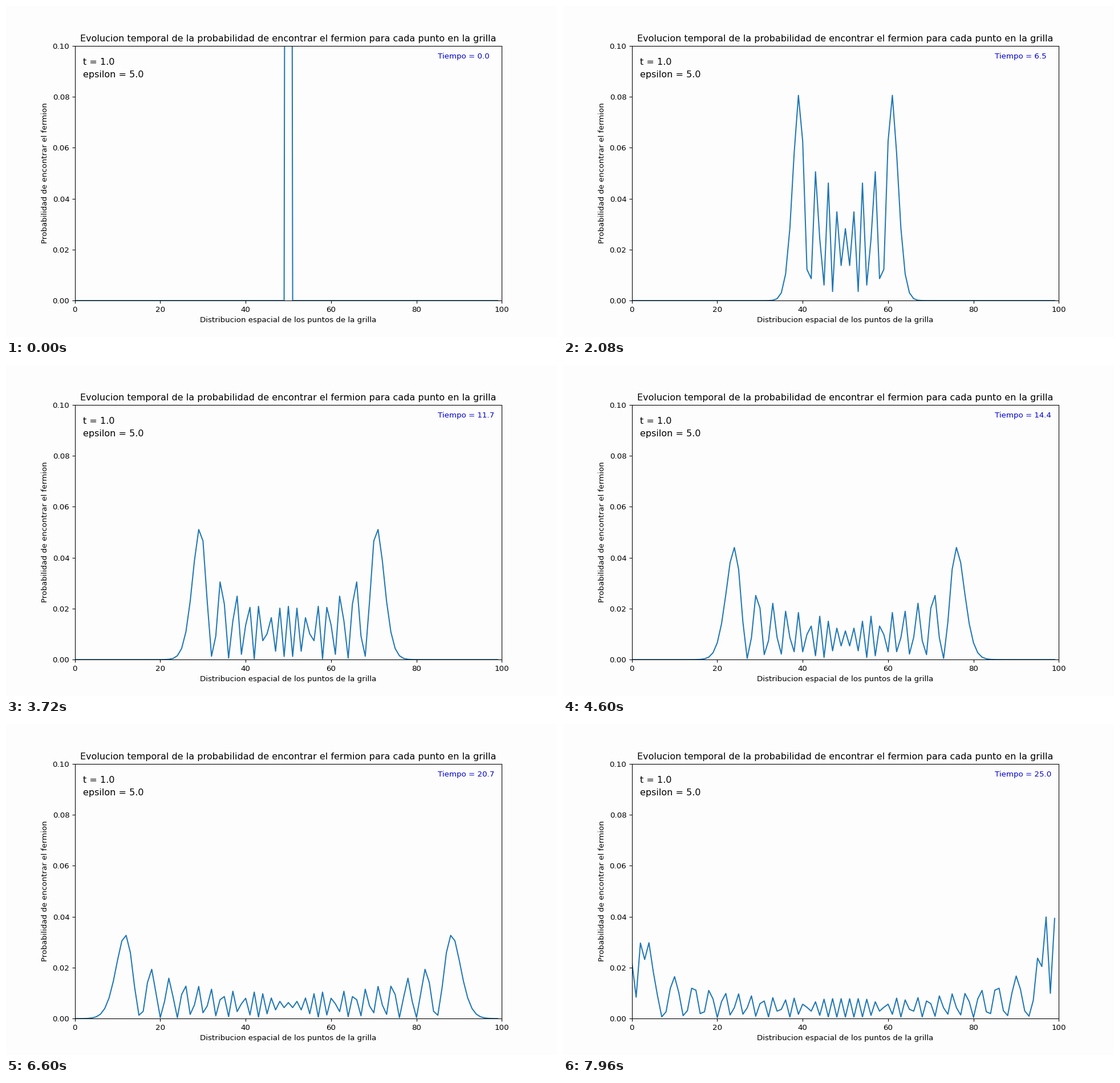
A matplotlib script that plays this animation: 966 px wide and 580 px high, repeating every 8000 ms.

```python
import numpy as np
import matplotlib.pyplot as plt
from matplotlib.animation import FuncAnimation

SITES, START = 100, 50
HOP, EPSILON = 1.0, 5.0
FRAMES, T_MAX = 200, 25.0
DPI = 96.6
PAPER = "#fdfdfd"
LARGE = 11.95

times = np.linspace(0, T_MAX, FRAMES)
dt = times[1] - times[0]


def evolve():
    """Site probabilities of a tight-binding chain, integrated with RK4."""
    H = EPSILON * np.eye(SITES) - HOP * (np.eye(SITES, k=1) + np.eye(SITES, k=-1))
    A = -1j * dt * H
    psi = np.zeros(SITES, dtype=complex)
    psi[START] = 1
    states = [psi, psi]
    while len(states) < FRAMES:
        k1 = A @ psi
        k2 = A @ (psi + k1 / 2)
        k3 = A @ (psi + k2 / 2)
        k4 = A @ (psi + k3)
        psi = psi + (k1 + 2 * k2 + 2 * k3 + k4) / 6
        states.append(psi)
    return np.abs(states) ** 2


prob = evolve()

plt.rcParams["font.family"] = "DejaVu Sans"
fig, ax = plt.subplots(figsize=(966 / DPI, 580 / DPI), dpi=DPI, facecolor=PAPER)
ax.set_facecolor(PAPER)
ax.set_xlim(0, 100)
ax.set_ylim(0, 0.1)
ax.set_title("Evolucion temporal de la probabilidad de encontrar "
             "el fermion para cada punto en la grilla", fontsize=LARGE)
ax.set_xlabel("Distribucion espacial de los puntos de la grilla")
ax.set_ylabel("Probabilidad de encontrar el fermion", labelpad=4.5)
ax.text(1.93, 0.0925, f"t = {HOP}", fontsize=LARGE)
ax.text(1.93, 0.0875, f"epsilon = {EPSILON}", fontsize=LARGE)
clock = ax.text(85, 0.095, "", fontsize=10, color="mediumblue")
line, = ax.plot(np.arange(SITES), prob[0], color="#1f77b4", lw=1.5)


def update(i):
    line.set_ydata(prob[i])
    clock.set_text(f"Tiempo = {times[i]:.1f}")
    return line, clock


anim = FuncAnimation(fig, update, frames=FRAMES, interval=40, repeat=True, repeat_delay=0)
plt.show()
```
